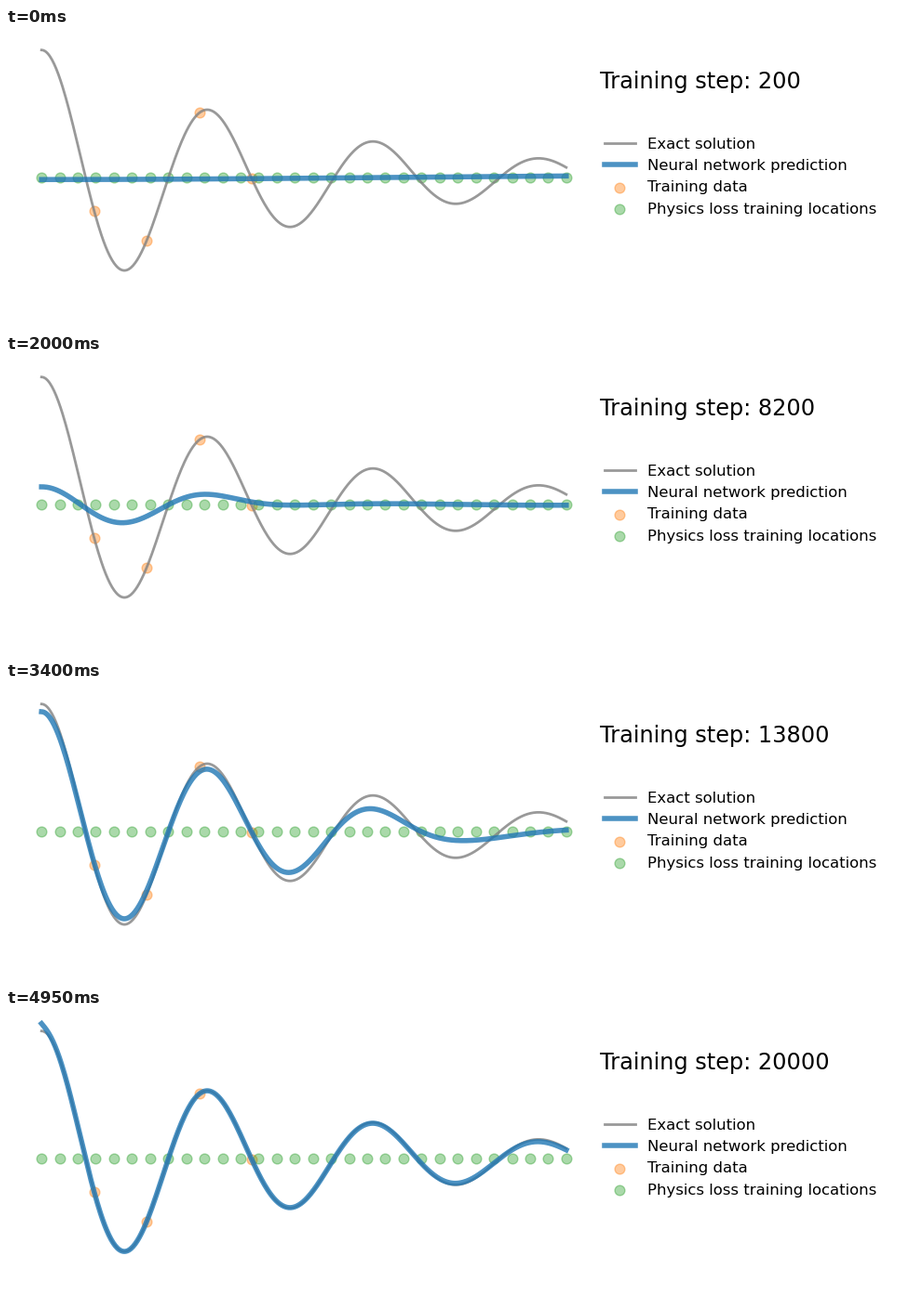
A matplotlib script that plays this animation: 955x322 px, repeating every 5 s.

```python
import numpy as np
import matplotlib.pyplot as plt
from matplotlib.animation import FuncAnimation

W, H, DPI = 955, 322, 100
FRAMES, INTERVAL, STEPS_PER_FRAME = 100, 50, 200
LAST_STEP = FRAMES * STEPS_PER_FRAME
UNIT = 302 / 2.2  # pixels per unit of y

plt.rcParams["font.family"] = "DejaVu Sans"

# Under-damped oscillator
DAMPING, W0 = 2, 20
OMEGA = np.sqrt(W0**2 - DAMPING**2)
PHI = np.arctan(-DAMPING / OMEGA)


def exact(x, lag=0):
    return np.exp(-DAMPING * x) * np.cos(PHI + OMEGA * x - lag) / np.cos(PHI)


def reach(step):
    """Position where the prediction has half of its amplitude."""
    return np.interp(step, [8000, 9600, 12000, 15400, LAST_STEP],
                     [0.40, 0.51, 0.70, 0.775, 1.47])


def wobble(x, step):
    """Faint wave of the untrained network."""
    keys = [200, 3400, 6800]
    amp = np.interp(step, keys, [2.2, 4.8, 6.5]) / UNIT
    decay = np.interp(step, keys, [0, 2, 2])
    freq = np.interp(step, keys, [2.4, 5, 6.2])
    return -amp * np.exp(-decay * x) * np.cos(freq * x)


def predict(x, step):
    """The fit snaps in near the data, then spreads to the right."""
    onset = 1 / (1 + np.exp((8830 - step) / 440))
    gain = onset * (0.91 + 0.09 * (step / LAST_STEP)**3)
    edge = reach(step)
    fade = 1 / (1 + (x / edge)**4.5)
    lag = 0.32 * np.logaddexp(0, (x - edge) / 0.04)
    kick = max(0, step - 17000) / 3000 * 8 / UNIT * np.exp(-x / 0.012)
    return (gain * fade * exact(x, lag)
            + (1 - onset) * wobble(x, step) + kick)


x = np.linspace(0, 1, 500)
x_data = x[50:201:50]
x_phys = np.linspace(0, 1, 30)

fig = plt.figure(figsize=(W / DPI, H / DPI), dpi=DPI, facecolor="white")
ax = fig.add_axes([10 / W, 10 / H, 620 / W, 302 / H])
ax.set_xlim(-0.05, 1.05)
ax.set_ylim(-1.1, 1.1)
ax.axis("off")

ax.plot(x, exact(x), color="grey", lw=2, alpha=0.8, label="Exact solution")
curve, = ax.plot(x, predict(x, STEPS_PER_FRAME), color="tab:blue", lw=4,
                 alpha=0.8, label="Neural network prediction")
ax.scatter(x_data, exact(x_data), s=60, color="tab:orange", alpha=0.4,
           label="Training data")
ax.scatter(x_phys, 0 * x_phys, s=60, color="tab:green", alpha=0.4,
           label="Physics loss training locations")
# Just under 12 pt, so that hinting keeps the letters low
ax.legend(loc=(1.01, 0.34), frameon=False, fontsize=11.87)
title = ax.text(1.065, 0.7, "", fontsize="xx-large", color="k")


def update(i):
    step = STEPS_PER_FRAME * (i + 1)
    curve.set_ydata(predict(x, step))
    title.set_text(f"Training step: {step}")
    return curve, title


anim = FuncAnimation(fig, update, frames=FRAMES, interval=INTERVAL,
                     repeat=True, repeat_delay=0)
plt.show()
```
